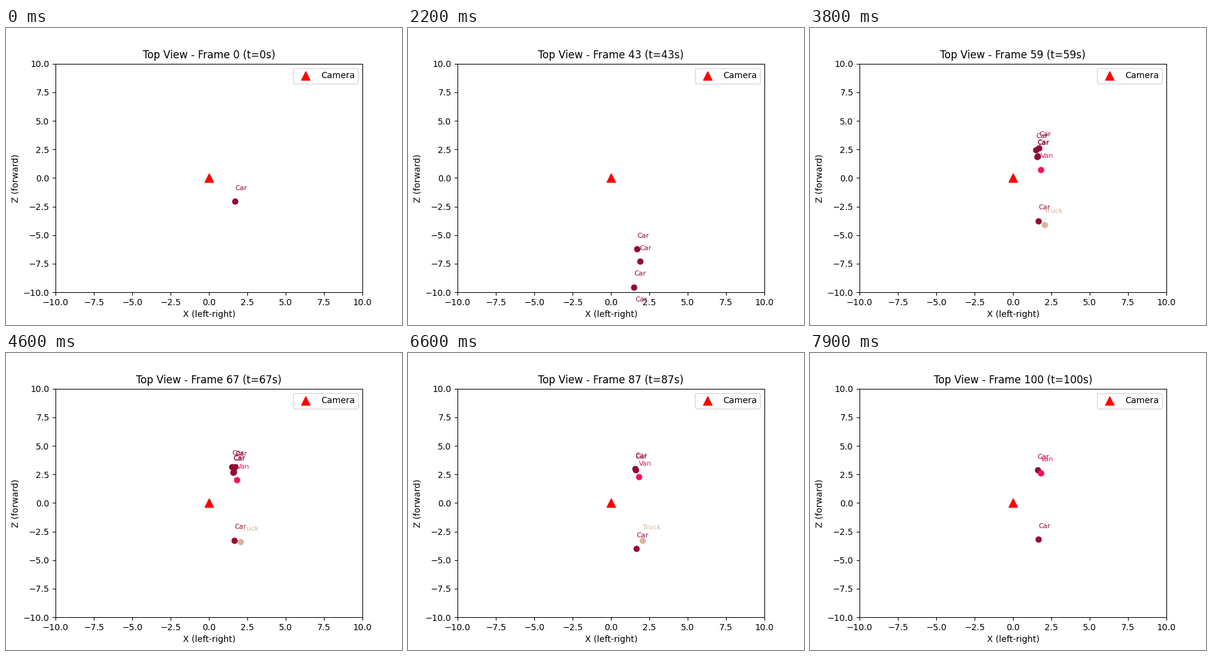
These frames come from a looping animation (640x480 px, 8000 ms). A matplotlib script:

```python
import math

import matplotlib.pyplot as plt
from matplotlib.animation import FuncAnimation

STEPS = 80
SKIP_AT, SKIP = 12, 21  # the recording has a gap after this step
EARLY, LATE = 6.2, 4.0  # braking times of the two groups of traffic
HIDDEN = -15            # labels are off the figure below this z

COLORS = {"Car": "#930b34", "Van": "#f5115c", "Truck": "#d9b49f"}


class Vehicle:
    """A labelled dot that brakes along z until it rests at `stop`.

    At step `near` it is one unit short of `stop`. `roll` is an extra
    shift that swells and fades around step `roll_at`.
    """

    def __init__(self, kind, x, stop, near, brake, last=STEPS,
                 roll=0, roll_at=0):
        self.x, self.stop, self.near, self.brake = x, stop, near, brake
        self.last, self.roll, self.roll_at = last, roll, roll_at
        color = COLORS[kind]
        self.dot = ax.scatter([x], [0], s=40, color=color)
        self.label = ax.text(x, 0, kind, fontsize=8, color=color)

    def z(self, step):
        gap = math.exp((self.near - step) / self.brake)
        swell = math.exp(-((step - self.roll_at) / 9) ** 2)
        return self.stop - gap + self.roll * swell

    def update(self, step):
        z = self.z(step)
        shown = step <= self.last and z > HIDDEN
        self.dot.set_visible(shown)
        self.label.set_visible(shown)
        if shown:
            self.dot.set_offsets([(self.x, z)])
            self.label.set_position((self.x, z + 1))


fig, ax = plt.subplots(figsize=(6.4, 4.8), dpi=100)
ax.set(xlim=(-10, 10), ylim=(-10, 10),
       xlabel="X (left-right)", ylabel="Z (forward)")
title = ax.set_title("")
ax.scatter([0], [0], s=100, c="red", marker="^", label="Camera")
ax.legend(loc="upper right")

traffic = [
    Vehicle("Car", 1.69, -1.96, -50, EARLY, last=11, roll=-0.3, roll_at=10),
    Vehicle("Car", 5.65, -12.3, 16, 1, last=17),
    Vehicle("Car", 1.71, 3.35, 36, EARLY, last=55),
    Vehicle("Car", 1.89, -2.6, 31.6, EARLY, last=35),
    Vehicle("Car", 1.5, 3.45, 37.9, EARLY, last=55),
    Vehicle("Car", 1.57, 3.0, 38.7, EARLY, last=72),
    Vehicle("Car", 1.6, 2.87, 37.7, LATE),
    Vehicle("Car", 1.65, -3.15, 35.9, LATE, roll=-0.95, roll_at=63),
    Vehicle("Van", 1.8, 2.22, 39.6, LATE, roll=0.42, roll_at=79),
    Vehicle("Truck", 2.05, -3.3, 37, LATE, last=72),
]


def draw(step):
    n = step if step < SKIP_AT else step + SKIP
    title.set_text(f"Top View - Frame {n} (t={n}s)")
    for vehicle in traffic:
        vehicle.update(step)


anim = FuncAnimation(fig, draw, frames=STEPS, interval=100,
                     repeat=True, repeat_delay=0)
plt.show()
```
